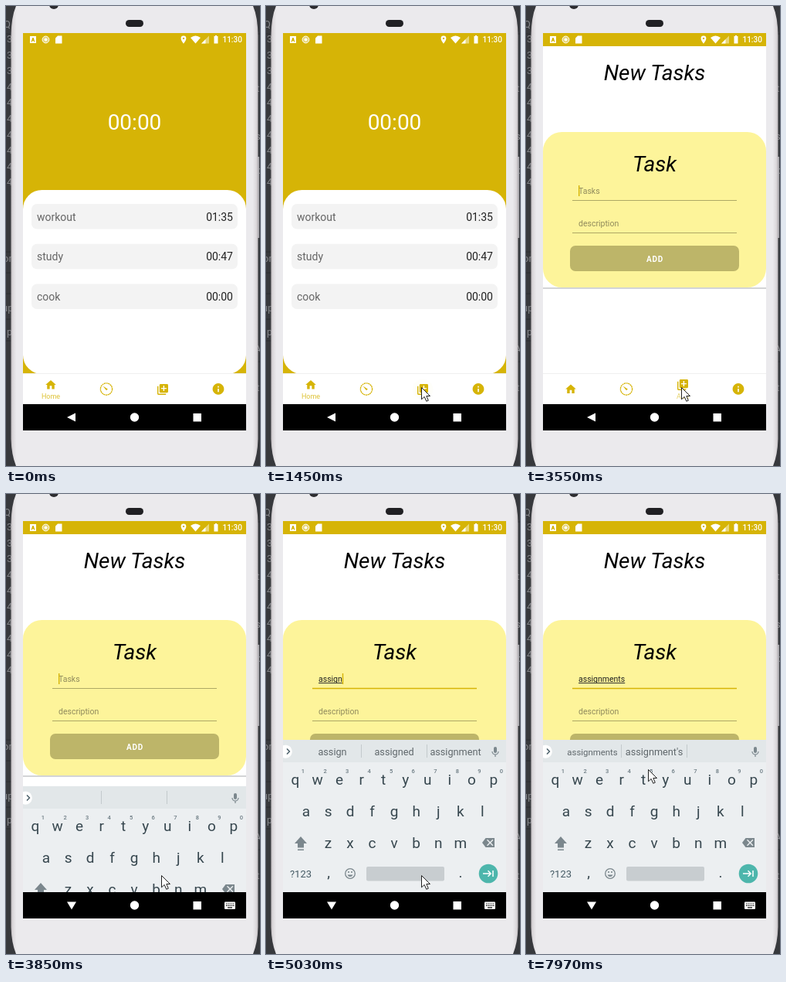
Write an HTML page that moves like this. It is 329 px wide and 595 px high and loops after 8000 ms.

```html
<!DOCTYPE html>
<html lang="en">
<head>
<meta charset="utf-8">
<style>
html, body { margin: 0; width: 100%; height: 100%; overflow: hidden; background: #37393d }
svg { display: block; width: 329px; height: 595px; font-family: Roboto, Arial, sans-serif }
.mid { text-anchor: middle }
.end { text-anchor: end }
.gold { fill: #d6b406 }
.title { font-size: 28px; font-style: italic; text-anchor: middle }
.field { font-size: 10.5px }
.hint { fill: #8f8a5c }
.label { font-size: 9px; text-anchor: middle }
.row { font-size: 14px }
.key { font-size: 19px; fill: #37474f; text-anchor: middle }
.num { font-size: 7.5px; font-weight: 500; fill: #6b7a82; text-anchor: middle }
.sug { fill: #5f676b; text-anchor: middle }
.code { font-size: 13px; fill: #85878b }
</style>
</head>
<body>
<svg viewBox="0 0 329 595">
  <defs>
    <linearGradient id="side">
      <stop offset="0" stop-color="#bfbabd"/><stop offset=".008" stop-color="#dcd9dc"/>
      <stop offset=".022" stop-color="#ebeaed"/><stop offset=".978" stop-color="#ebeaed"/>
      <stop offset=".992" stop-color="#dcd9dc"/><stop offset="1" stop-color="#bfbabd"/>
    </linearGradient>
    <clipPath id="bar"><rect x="22" y="476" width="289" height="39"/></clipPath>
    <clipPath id="screen"><rect x="22" y="35" width="289" height="480"/></clipPath>
  </defs>

  <!-- desktop behind the phone -->
  <rect width="329" height="595" fill="#37393d"/>
  <path d="M0 36H14M0 318H14M0 345H14M0 372H14M0 405H14M0 433H14M320 36h9M320 460h9" stroke="#2b2d31"/>
  <g id="desk" class="code"></g>
  <path d="M327 195V300" stroke="#a9a9ae" stroke-width="2"/>

  <!-- phone -->
  <path d="M13 0Q7 14 6.500 38V560Q7 580 13 595H320Q326 580 326.500 560V38Q326 14 320 0Z" fill="url(#side)"/>
  <circle cx="62" cy="-2" r="6" fill="#2c2c30"/>
  <rect x="155" y="18" width="23" height="9" rx="4.5" fill="#202023"/>
  <rect x="22" y="35" width="289" height="514" fill="#fff"/>

  <g id="home">
    <path class="gold" d="M22 35H311V476H22Z"/>
    <rect x="22" y="238" width="289" height="238" rx="24.500" fill="#fff"/>
    <text class="mid" x="166.5" y="160" font-size="28" fill="#fff">00:00</text>
    <g id="rows" class="row"></g>
  </g>

  <g id="form">
    <text class="title" x="166.5" y="96">New Tasks</text>
    <path d="M22 365H311" stroke="#d3d4d6" stroke-width="2"/>
    <rect x="22" y="163" width="289" height="201" rx="24.500" fill="#fdf49a"/>
    <text class="title" x="166.5" y="214">Task</text>
    <text id="typed" class="field" x="68" y="243"></text>
    <path id="under" stroke="#333"/>
    <rect id="caret" class="gold" y="232" width="1.4" height="14"/>
    <text class="field hint" x="68" y="285">description</text>
    <path id="line" d="M60 251.5H273"/>
    <path d="M60 293.5H273" stroke="#aea864"/>
    <rect x="57" y="310" width="219" height="33" rx="7" fill="#bdb569"/>
    <text class="mid" x="167" y="330.5" font-size="10" font-weight="700" letter-spacing=".7" fill="#fff">ADD</text>
  </g>

  <!-- status bar -->
  <path class="gold" d="M22 35H311V52H22Z"/>
  <g fill="#fff">
    <path fill-rule="evenodd" d="M31 39h8v9h-8ZM32.5 46.5h1.2l.4-1.2h1.8l.4 1.2h1.2L35.7 41h-1.4Z"/>
    <circle cx="51.5" cy="43.5" r="4.4" fill="#fff" fill-opacity=".45" stroke="#fff"/>
    <circle cx="51.5" cy="43.5" r="2"/>
    <path d="M67 38.500h5.500V48.500H64V41.500Z"/>
    <path fill-rule="evenodd" d="M230 38.500a3.400 3.400 0 0 1 3.400 3.400c0 2.600-3.400 6.600-3.400 6.600s-3.400-4-3.400-6.600a3.400 3.400 0 0 1 3.400-3.400m0 2.200a1.200 1.200 0 1 0 .01 0Z"/>
    <path d="M239 41Q245.500 36 252 41L245.500 48.500Z"/>
    <path d="M263 38.500V48.500H253Z" opacity=".45"/><path d="M258.500 43V48.500H253Z"/>
    <path d="M271 38h2v1h1.500v9.500h-5V39h1.500Z"/>
    <text x="280.500" y="47.300" font-size="10" font-weight="500">11:30</text>
  </g>

  <!-- tab bar -->
  <path d="M22 475.500H311" stroke="#efefef"/>
  <g class="gold" clip-path="url(#bar)">
    <rect x="22" y="476" width="289" height="39" fill="#fff"/>
    <circle id="ripple" cx="203" cy="496"/>
    <path id="homeIcon" d="M-2 8V2H2V8H7V0H10L0-9-10 0H-7V8Z"/>
    <text id="homeLabel" class="label" x="58" y="508">Home</text>
    <circle cx="130" cy="495.500" r="7.600" fill="none" stroke="#d6b406" stroke-width="1.300" stroke-dasharray="2.200 .5"/>
    <path d="M125.500 491.500 131.800 495.500 130 497.200Z"/>
    <g id="addIcon">
      <path d="M-8-6h-2V8q0 2 2 2H6V8H-8Z"/>
      <path fill-rule="evenodd" d="M-4-10H8q2 0 2 2V4q0 2-2 2H-4q-2 0-2-2V-8q0-2 2-2M7-1V-3H3V-7H1V-3H-3V-1H1V3H3V-1Z"/>
    </g>
    <text id="addLabel" class="label" x="203" y="508">Add</text>
    <path fill-rule="evenodd" d="M275 488a7.400 7.400 0 1 0 .01 0M274.200 495h1.600v4.300h-1.600ZM274.200 491.800h1.600v1.600h-1.600Z"/>
  </g>

  <g clip-path="url(#screen)">
    <g id="keys">
      <path d="M22 318H311V347H22Z" fill="#e2e7e9"/>
      <path d="M22 347H311V549H22Z" fill="#eceff1"/>
      <path d="M22 325.300A8.500 8.500 0 1 1 22 341Z" fill="#fff"/>
      <path d="M27 329.500 30.500 333 27 336.500" fill="none" stroke="#455a64" stroke-width="1.400"/>
      <path d="M123.500 324V341M208.500 324V341" stroke="#c3c9cc"/>
      <g id="sugs"></g>
      <g fill="#7b878d">
        <rect x="295" y="327" width="4" height="8" rx="2"/>
        <path d="M293 333a4 4 0 0 0 8 0M297 337V340" fill="none" stroke="#7b878d" stroke-width="1.200"/>
        <path d="M45 443 53 452H49V457.500H41V452H37ZM41 459.500h8v1.500h-8Z"/>
        <path fill-rule="evenodd" d="M284.500 445H296V457H284.500L280 451ZM286 447.800 289.200 451 286 454.200 287 455.200 290.200 452 293.400 455.200 294.400 454.200 291.200 451 294.400 447.800 293.400 446.800 290.200 450 287 446.800Z"/>
        <circle cx="107" cy="489" r="1.100"/><circle cx="111" cy="489" r="1.100"/>
        <path d="M105.500 492.500a3.700 3.700 0 0 0 7 0Z"/>
        <circle cx="109" cy="491" r="6.300" fill="none" stroke="#7b878d" stroke-width="1.300"/>
      </g>
      <text class="mid" x="45" y="496" font-size="13" fill="#455a64">?123</text>
      <text class="key" x="81" y="496">,</text><text class="key" x="252" y="496">.</text>
      <rect x="130" y="482" width="101" height="18.500" rx="2" fill="#c8cdd0"/>
      <circle cx="288" cy="491" r="12.300" fill="#4db6ac"/>
      <path d="M281 491H291M287.500 487.300 291.200 491 287.500 494.700M294 487V495" fill="none" stroke="#fff" stroke-width="1.500"/>
    </g>
  </g>

  <!-- system bar -->
  <path d="M22 515H311V549H22Z"/>
  <g fill="#fff">
    <path id="back"/>
    <circle cx="166.500" cy="532" r="5.700"/>
    <rect x="242.500" y="527" width="10.500" height="10.500"/>
    <g id="ime">
      <rect x="283" y="527.500" width="14" height="9.500" rx="1"/>
      <path d="M285 530H295.500M285 532.400H295.500" stroke="#000" stroke-width="1.200" stroke-dasharray="1.300 1"/>
      <path d="M287 535H293" stroke="#000" stroke-width="1.200"/>
    </g>
  </g>

  <path id="mouse" d="M.5.500V15.800L4.200 12.400 6.800 18.300 9.300 17.200 6.800 11.500H11.500Z" fill="#fff" stroke="#222"/>
</svg>
<script>
const $ = id => document.getElementById(id);
const set = (id, attrs) => { for (const k in attrs) $(id).setAttribute(k, attrs[k]); };
const text = (cls, x, y, s) => `<text class="${cls}" x="${x}" y="${y}">${s}</text>`;
const show = (id, on) => set(id, { visibility: on ? 'visible' : 'hidden' });

$('rows').innerHTML = [['workout', '01:35'], ['study', '00:47'], ['cook', '00:00']].map(([name, time], i) => {
  const y = 256 + i * 51.8;
  return `<rect x="33" y="${y}" width="267" height="32.500" rx="7" fill="#f3f3f3"/>
    <g fill="#666">${text('', 40, y + 21.500, name)}</g><g fill="#222">${text('end', 294, y + 21.500, time)}</g>`;
}).join('');

$('desk').innerHTML = [...'3334444444'].map((c, i) => text('', 1, 47 + i * 20.600, c)).join('') +
  [[-3, 28, 'Q'], [-4, 331, 'or'], [-5, 395, 'up'], [1, 426, 'p'], [324, 111, 't'],
   [323, 173, 's'], [324, 217, 'c'], [322, 448, 'A'], [324, 498, 't']].map(d => text('', ...d)).join('');

const letters = (row, x0, y) => [...row].map((c, i) => text('key', x0 + i * 28.550, y, c)).join('');
$('keys').insertAdjacentHTML('beforeend',
  letters('qwertyuiop', 38, 376) + letters('asdfghjkl', 52, 417) + letters('zxcvbnm', 80.500, 457.500) +
  [...'1234567890'].map((c, i) => text('num', 48 + i * 28.550, 361, c)).join(''));

// start time, typed letters, middle and right suggestions
const word = 'assignments';
const typing = [
  [3850, 0, '', ''], [3930, 1, 'and', 'are'], [4080, 2, 'and', 'are'], [4330, 3, 'assist', 'as'],
  [4630, 4, 'assign', 'assistant'], [4860, 5, 'assigned', 'assignment'], [5030, 6, 'assigned', 'assignment'],
  [5260, 7, 'assigned', 'assignment'], [5570, 8, 'assigned', 'assignment'], [5810, 9, 'assigned', 'assignment'],
  [5960, 10, 'assignments', "assignment's"], [7190, 11, "assignment's", '']
];
const blinks = [2080, 2540, 3000, 3550, 6580, 7040, 7740];

function mouseAt(t) {
  if (t >= 7970) return [158, 356];
  if (t >= 7890) return [181, 428];
  const p = Math.min(1, Math.floor((t - 300) / 76.600) / 9);
  const left = (1 - p) ** 1.500;
  return [201 + 77 * left, 493 + 92 * left];
}

function draw(t) {
  const form = t >= 1600, keys = t >= 3850;
  show('home', !form);
  show('form', form);
  show('keys', keys);
  show('ime', keys);
  set('back', { d: keys ? 'M79 527.500H91L85 537.500Z' : 'M79 532 90 526.500V537.500Z' });

  // tab change runs in visible steps
  const p = form ? [.6, .8, .93, 1][Math.min(3, Math.floor((t - 1600) / 83))] : 0;
  set('homeIcon', { transform: `translate(58 ${490 + 5.500 * p}) scale(.68)` });
  set('homeLabel', { opacity: form ? (1 - p) * .7 : .8 });
  set('addIcon', { transform: `translate(203 ${496 - 6 * p}) scale(.7)` });
  set('addLabel', { opacity: p * .6 });
  const press = t < 1300 ? 0 : Math.min(3, 1 + Math.floor((t - 1300) / 75));
  set('ripple', { r: form ? 36 : press * 4.500, opacity: form ? (1 - p) * .15 : .02 });

  // entry field
  const [, n, mid, right] = typing.findLast(s => t >= s[0]) || typing[0];
  const typed = word.slice(0, n);
  $('typed').textContent = typed || 'Tasks';
  set('typed', { fill: typed ? '#222' : '#8f8a5c' });
  const end = 68 + (n ? $('typed').getComputedTextLength() : 0);
  set('under', { d: n ? `M68 244.500H${end}` : '' });
  set('line', { stroke: n ? '#d6b406' : '#aea864', 'stroke-width': n ? 1.400 : 1 });
  set('caret', { x: end });
  const flips = blinks.filter(b => t >= b).length;
  show('caret', form && flips % 2 == 0);

  set('keys', { transform: `translate(0 ${t < 3930 ? 60 : 0})` });
  $('sugs').innerHTML = [typed, mid, right].map((s, i) =>
    `<text class="sug" x="${[86, 166, 245.500][i]}" y="337.500" font-size="${s.length > 10 && i != 1 ? 11.400 : 12.700}">${s}</text>`).join('');

  const [x, y] = mouseAt(t);
  show('mouse', t >= 300);
  set('mouse', { transform: `translate(${x} ${y})` });
}

const start = performance.now();
function tick() {
  draw((performance.now() - start) % 8000);
  requestAnimationFrame(tick);
}
tick();
</script>
</body>
</html>
```
